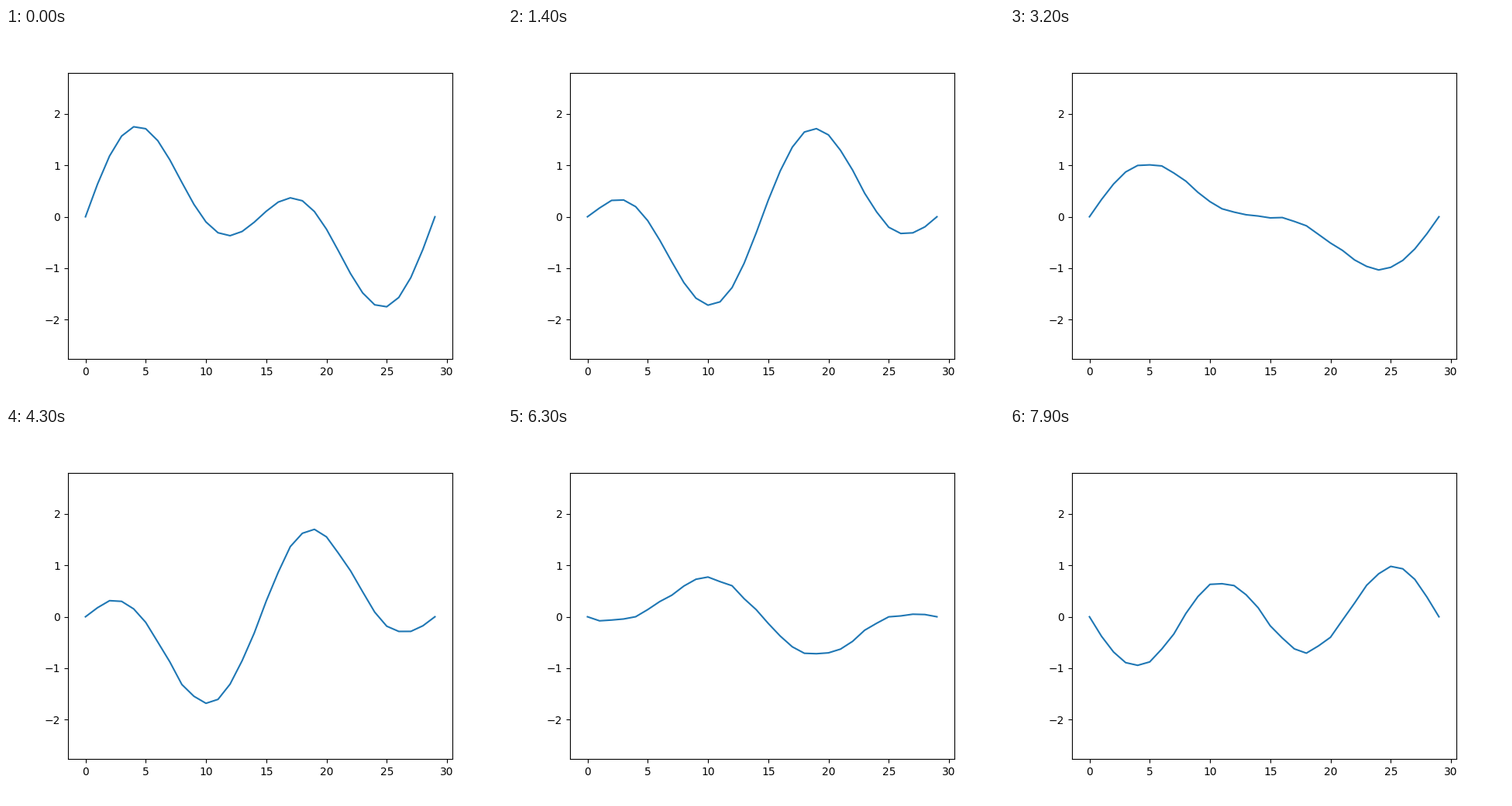
Animation, 640 px wide and 480 px high, one loop 8 s. Source, as a matplotlib script:

```python
import matplotlib.pyplot as plt
import numpy as np
from matplotlib.animation import FuncAnimation

N = 30          # masses on a spring chain, both ends fixed
L = N - 1
FRAMES = 80
KICK = 0.0035   # size of the random nudge each mass gets per step

x = np.arange(N)
modes = np.arange(1, L)
omega = 2 * np.sin(np.pi * modes / (2 * L))
basis = np.sin(np.pi * np.outer(x, modes) / L)


def simulate():
    """Shape of the chain at every step, as turning mode amplitudes."""
    rng = np.random.default_rng(4)
    amps = np.zeros(len(modes), dtype=complex)
    amps[[1, 3]] = 1
    shapes = []
    for _ in range(FRAMES):
        shapes.append(basis @ amps.real)
        amps *= np.exp(1j * omega)
        amps += rng.normal(0, KICK * np.sqrt(2 / L), len(modes))
    return shapes


shapes = simulate()

fig, ax = plt.subplots(figsize=(6.4, 4.8), dpi=100)
line, = ax.plot(x, shapes[0])
ax.set_ylim(-2.766, 2.801)


def update(t):
    line.set_ydata(shapes[t])
    return line,


anim = FuncAnimation(fig, update, frames=FRAMES, interval=100,
                     repeat=True, repeat_delay=0)
plt.show()
```
